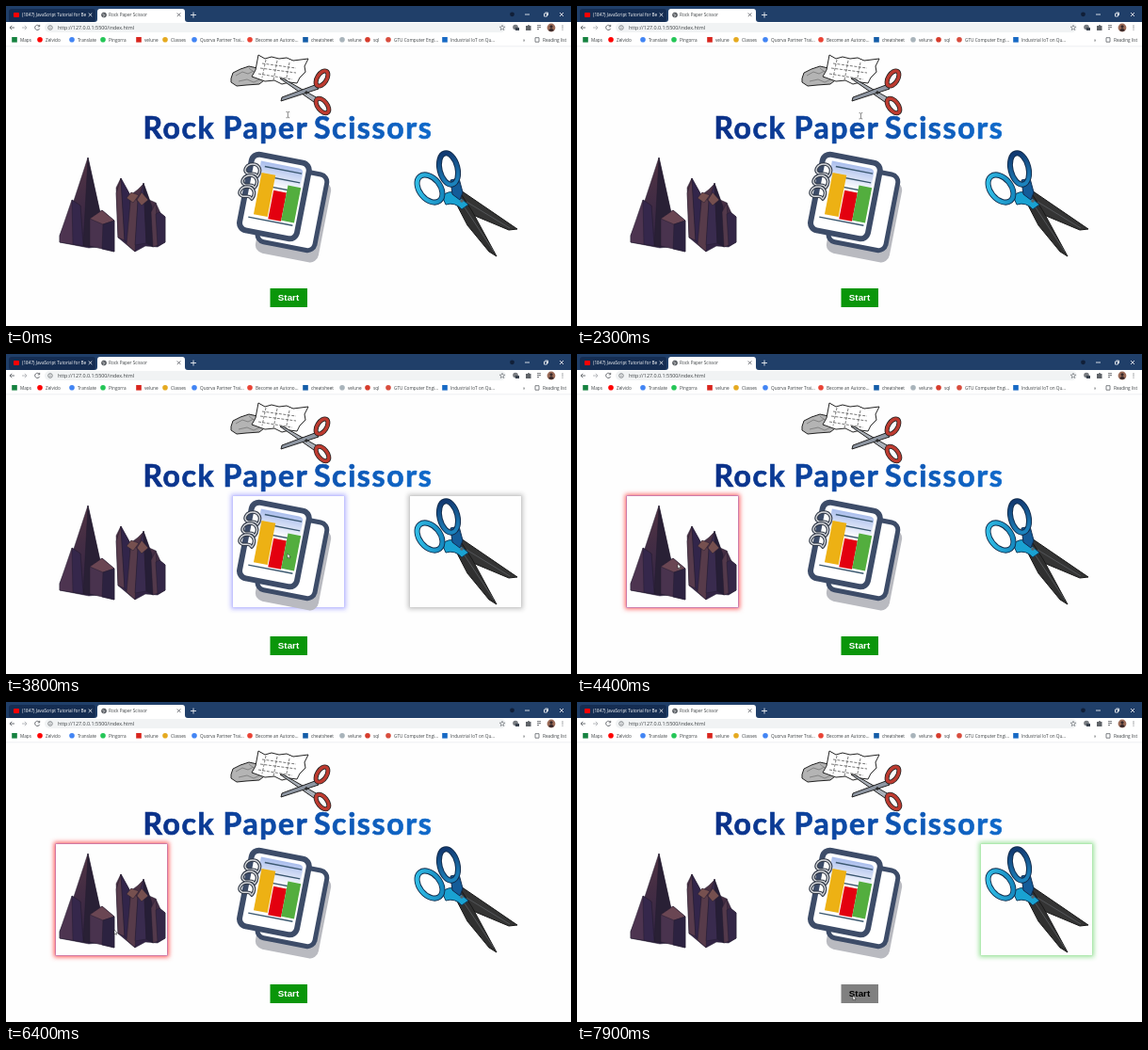
These frames come from a looping animation (600 px wide and 340 px high, 8000 ms). An HTML page:

```html
<!DOCTYPE html>
<html lang="en">
<head>
<meta charset="utf-8">
<title>Rock Paper Scissor</title>
<style>
html, body { margin: 0; width: 100%; height: 100%; overflow: hidden; background: #fefefe; }
svg { display: block; width: 600px; height: 340px; }
.ui { font-family: "Open Sans", "Noto Sans", sans-serif; font-size: 4.7px; fill: #3c4043; }
.title { font: 700 32px Lato, "Open Sans", sans-serif; letter-spacing: 1.6px; fill: url(#ink); stroke: url(#ink); stroke-width: .7; }
.icon { fill: none; stroke: #5f6368; stroke-width: .9; }
.window { fill: none; stroke: #fff; stroke-width: .8; }
.line { stroke: #222; stroke-width: 1; stroke-linejoin: round; }
</style>
</head>
<body>
<svg viewBox="0 0 600 340">
  <defs>
    <linearGradient id="ink" gradientUnits="userSpaceOnUse" x1="147" y1="0" x2="455" y2="0">
      <stop stop-color="#0a2f87"/><stop offset="1" stop-color="#0f6acb"/>
    </linearGradient>
    <linearGradient id="sky" x1="0" y1="0" x2="0" y2="1">
      <stop stop-color="#a9bdec"/><stop offset="1" stop-color="#fff"/>
    </linearGradient>
    <linearGradient id="cyan" x1="0" y1="0" x2="1" y2="1">
      <stop stop-color="#35c5ec"/><stop offset="1" stop-color="#1280b8"/>
    </linearGradient>
    <linearGradient id="navy" x1="0" y1="0" x2="0" y2="1">
      <stop stop-color="#123a72"/><stop offset="1" stop-color="#1c83bd"/>
    </linearGradient>
    <linearGradient id="dusk" x1="0" y1="0" x2="0" y2="1">
      <stop stop-color="#513443"/><stop offset="1" stop-color="#302345"/>
    </linearGradient>
    <filter id="soft" x="-20%" y="-20%" width="140%" height="140%"><feGaussianBlur stdDeviation="2.6"/></filter>
  </defs>

  <rect width="600" height="340" fill="#fefefe"/>

  <!-- Browser frame -->
  <rect width="600" height="17" fill="#203f69"/>
  <rect x="3" y="3" width="92" height="14" rx="3" fill="#152d52"/>
  <path d="M94 17q3 0 3-3V6q0-3 3-3h87q3 0 3 3v8q0 3 3 3z" fill="#fff"/>
  <rect y="17" width="600" height="26" fill="#fff"/>
  <rect x="41" y="18" width="490" height="10" rx="5" fill="#f1f3f4"/>
  <path d="M0 42.8H600" stroke="#e3e5e8" stroke-width=".6"/>
  <rect x="8" y="7" width="6" height="5" rx="1" fill="#f00"/>
  <g class="icon">
    <circle cx="104" cy="9.5" r="2.5" fill="#5f6368"/>
    <path d="M102.5 8.5l2 1-1 2" stroke="#fff" stroke-width=".6"/>
    <path d="M181.8 7.5l3.6 3.6m0-3.6l-3.6 3.6"/>
    <path d="M9 23H4m2.2-2.2L4 23l2.2 2.2"/>
    <path d="M17 23h5m-2.2-2.2L22 23l-2.2 2.2" stroke="#b0b3b7"/>
    <path d="M35.5 21.5a2.6 2.6 0 1 0 .2 2.4m0-4v2h-2"/>
    <circle cx="47" cy="23" r="2.3" stroke-width=".7"/><path d="M47 22.6v1.6m0-2.8v.5" stroke-width=".7"/>
    <path d="M527 20.3l.8 1.8 2 .1-1.6 1.3.5 2-1.7-1.1-1.7 1.1.5-2-1.6-1.3 2-.1z" stroke-width=".6"/>
    <path d="M564 20.7h4m-4 2h4m-4 2h2" />
    <path d="M562 33.7h4v4.5h-4z" stroke-width=".8"/>
  </g>
  <circle cx="541" cy="22.5" r="2.8" fill="#777b80"/><rect x="541" y="23" width="4" height="3" fill="#39424e"/>
  <path d="M552 21h2a1 1 0 0 1 2 0h1.5v5H552z" fill="#5f6368"/>
  <circle cx="579" cy="23" r="4.4" fill="#9b6b58"/>
  <circle cx="579" cy="21.8" r="1.6" fill="#392a2b"/><path d="M576 26q3-5 6 0-3 2-6 0" fill="#392a2b"/>
  <path d="M591 20.5v.9m0 1.2v.9m0 1.2v.9" stroke="#5f6368" stroke-width="1.1"/>
  <g class="window">
    <path d="M87.7 7.5l3.6 3.6m0-3.6l-3.6 3.6M196 9.5h6m-3-3v6M551 9h5M571.5 8h3v3h-3zm1-1h3v3M588 7l4 4m0-4l-4 4"/>
    <circle cx="537.5" cy="8.8" r="2.4" fill="#101f38" stroke="none"/>
  </g>
  <g class="ui">
    <text x="17" y="11.2" fill="#fff" style="fill:#fff">(1847) JavaScript Tutorial for Be</text>
    <text x="109" y="11.2">Rock Paper Scissor</text>
    <text x="55" y="25" font-size="5.5" style="font-size:5.4px">http://127.0.0.1:5500/index.html</text>
    <text x="549" y="38">»</text>
    <text x="570" y="37.7">Reading list</text>
    <g id="bookmarks"></g>
  </g>

  <!-- Small heading picture -->
  <g class="line">
    <path d="M239 77l2-6 8-4 9-3 9 2 5 6 2 7-5 4-14 1-10 1-6-4z" fill="#b4b4b4"/>
    <path d="M244 74l7-4 6 2 6-3M247 80l9-2 7 3 7-3M258 66l5 4 8 3" fill="none" stroke="#777" stroke-width=".8"/>
    <path d="M268 52l7 4 7-2 8 2 8-1 7 3 16-2-4 8 1 6-6 6-3 6-8-1-8 2-8-4-10 1-14-5 4-7z" fill="#fff"/>
    <path d="M272 61l36 5M270 66l38 5M268 72l36 6M276 57l-4 19M288 58l-4 21M301 60l-4 21" fill="none" stroke-width=".6" stroke-dasharray="3 1.5"/>
    <path d="M291 77l3 0 37 21-4 4z" fill="#aab0b8"/>
    <path d="M292 101l1-4 35-13 4 4z" fill="#8e96a2"/>
    <g fill="none">
      <ellipse cx="335.5" cy="77" rx="5" ry="9" transform="rotate(32 335.5 77)" stroke="#222" stroke-width="5"/>
      <ellipse cx="336" cy="106" rx="5" ry="9" transform="rotate(-38 336 106)" stroke="#222" stroke-width="5"/>
      <ellipse cx="335.5" cy="77" rx="5" ry="9" transform="rotate(32 335.5 77)" stroke="#bd3b30" stroke-width="3.4"/>
      <ellipse cx="336" cy="106" rx="5" ry="9" transform="rotate(-38 336 106)" stroke="#bd3b30" stroke-width="3.4"/>
    </g>
    <circle cx="319" cy="92" r="1.2" fill="#444"/>
  </g>
  <g class="title">
    <text x="145.5" y="141">Rock</text><text x="230.5" y="141">Paper</text><text x="327" y="141">Scissors</text>
  </g>

  <g id="glows"></g>

  <!-- Crystals -->
  <g stroke="#251c31" stroke-width=".5" stroke-linejoin="round">
    <path d="M87 161l-17 52-13 31v7l31 6 9-1 3-36z" fill="url(#dusk)"/>
    <path d="M87 161l-5 94 15 1 3-36z" fill="#292035"/>
    <path d="M70 206l-13 38v7l25 4-3-43z" fill="#4d3450"/>
    <path d="M70 206l9 6 3 43-11-2z" fill="#35274b"/>
    <path d="M89 226l13-9 13 11v33l-26-6z" fill="#49334e"/>
    <path d="M89 226l13-9 13 11-12 4z" fill="#6a4653"/>
    <path d="M103 232l12-4v33l-13-3z" fill="#2c2240"/>
    <path d="M122 183l10 18 8-6 6-6 6 17 7 3 5 11 5 4v27l-8 5-13-1-11 6-18-15-2-53z" fill="url(#dusk)"/>
    <path d="M122 183l-5 16 2 47 7 3z" fill="#573b4c"/>
    <path d="M122 183l10 18-2 52-4-4z" fill="#32254a"/>
    <path d="M133 198l7 10-3 53-9-8z" fill="#573b4a"/>
    <path d="M146 188l-6 20-3 46 12-2z" fill="#392b4e"/>
    <path d="M146 188l9 25 1 43-7-4z" fill="#261e36"/>
    <path d="M159 209l-5 10 2 37 6-2z" fill="#53394b"/>
    <path d="M159 221l4-2 6 5v27l-8 4z" fill="#342747"/>
    <path d="M128 204l5-6 8 3-6 8zm11 2l5-8 7 8-7 6z" fill="#76504f"/>
  </g>

  <!-- Notebook -->
  <g transform="translate(285 202) rotate(11)">
    <rect x="-9" y="-29" width="68" height="87" rx="9" fill="#b9bac0" transform="translate(-1 4)"/>
    <rect x="-10" y="-32" width="62" height="82" rx="8" fill="#fff" stroke="#3d4c68" stroke-width="5"/>
    <rect x="-31" y="-40.5" width="62" height="82" rx="8" fill="#fff" stroke="#3d4c68" stroke-width="6"/>
    <path d="M-21-34h41q5 0 5 5v20h-46z" fill="url(#sky)"/>
    <path d="M-16-29h40m-40 10h40m-40 10h40M-23 27h48" stroke="#3b5870" stroke-width="1.4"/>
    <path d="M-18-22h15v45h-15z" fill="#edb114"/>
    <path d="M-2-6h14v31H-2z" fill="#e3000f"/>
    <path d="M12-14h14v38H12z" fill="#53ae3e"/>
  </g>
  <g id="rings" fill="none" stroke-linecap="round"></g>

  <!-- Large scissors -->
  <g stroke-linejoin="round">
    <path d="M478 199l5-3 60 41-9 1-43-18z" fill="#343434" stroke="#181818"/>
    <path d="M474 202l8-4 13 20 26 48-8-5-23-28z" fill="#303030" stroke="#181818"/>
    <path d="M485 211l33 50M489 208l46 28" stroke="#606468" stroke-width=".7"/>
    <path d="M463 202q8-7 14-3l14 12-7 5q-7-8-17-5z" fill="#19a2d2" stroke="#103a5a"/>
    <path d="M472 185l9-2 4 15-3 8-8-6z" fill="#145c99" stroke="#102c50"/>
    <g fill="none">
      <ellipse cx="470" cy="173" rx="9.5" ry="17" transform="rotate(-14 470 173)" stroke="#102b4c" stroke-width="6"/>
      <ellipse cx="470" cy="173" rx="9.5" ry="17" transform="rotate(-14 470 173)" stroke="url(#navy)" stroke-width="4"/>
      <ellipse cx="450" cy="194" rx="11" ry="16.5" transform="rotate(-39 450 194)" stroke="#102b4c" stroke-width="6"/>
      <ellipse cx="450" cy="194" rx="11" ry="16.5" transform="rotate(-39 450 194)" stroke="url(#cyan)" stroke-width="4.2"/>
    </g>
    <circle cx="484" cy="207" r="1.8" fill="#59646b"/>
  </g>

  <rect id="button" x="280.5" y="300" width="39.5" height="20"/>
  <text id="label" x="300" y="313.2" text-anchor="middle" font-family="Liberation Sans, sans-serif" font-size="9.8" font-weight="700">Start</text>

  <path id="beam" d="M297.5 112.5h1.2l.6.6.6-.6h1.2m-1.8.6v5m-1.8.6h1.2l.6-.6.6.6h1.2" fill="none" stroke="#333" stroke-width=".6"/>
  <path id="arrow" d="M0 0v6l1.4-1.2 1 2 1-.5-.9-1.9H4.4z" fill="#fff" stroke="#222" stroke-width=".6"/>
</svg>
<script>
const LOOP = 8000;
const byId = id => document.getElementById(id);

function add(parent, tag, attrs, text = "") {
  const node = document.createElementNS("http://www.w3.org/2000/svg", tag);
  for (const key in attrs) node.setAttribute(key, attrs[key]);
  node.textContent = text;
  parent.append(node);
  return node;
}

const bookmarks = [
  [9, "Maps", "#15823f"], [36, "Zelvido", "#f00"], [70, "Translate", "#4285f4"],
  [103, "Pingorra", "#25c657"], [141, "velune", "#d9251d"], [169, "Classes", "#e5aa20"],
  [200, "Quorva Partner Trai...", "#4285f4"], [259, "Become an Autono...", "#ea4335"],
  [318, "cheatsheet", "#145da8"], [357, "velune", "#a9b4bb"], [384, "sql", "#d63c2c"],
  [406, "GTU Computer Engi...", "#d84d3e"], [466, "Industrial IoT on Qu...", "#1769c5"]
];
bookmarks.forEach(([x, name, fill], i) => {
  if (i % 4) add(byId("bookmarks"), "circle", { cx: x, cy: 35.8, r: 2.8, fill });
  else add(byId("bookmarks"), "rect", { x: x - 2.8, y: 33, width: 5.6, height: 5.6, fill });
  add(byId("bookmarks"), "text", { x: x + 6, y: 37.7 }, name);
});

for (let i = 0; i < 3; i++) {
  const d = `M${267 - i * 3} ${181 + i * 12}c5-6 2-13-5-13c-7 0-11 8-5 10c4 1 8-1 9 2`;
  add(byId("rings"), "path", { d, stroke: "#303846", "stroke-width": 3.6 });
  add(byId("rings"), "path", { d, stroke: "#d6d8dc", "stroke-width": 1.4 });
}

// Card x, outer colour, inner colour, hover start and end
const hovers = [
  [429, "#222", "#222", 2700, 3580],
  [241, "#2929ff", "#2929ff", 3740, 3920],
  [53, "#ff6464", "#4545f0", 4000, 4680],
  [241, "#2929ff", "#2929ff", 4840, 5600],
  [53, "#ff5555", "#5555ee", 5780, 6600],
  [241, "#2929ff", "#2929ff", 6700, 6840],
  [429, "#2fc52f", "#2fc52f", 6950, 7740]
].map(([x, outer, inner, start, end]) => {
  const group = add(byId("glows"), "g", {});
  const box = (grow, attrs) => add(group, "rect", {
    x: x - grow, y: 151 - grow, width: 118 + 2 * grow, height: 118 + 2 * grow, ...attrs
  });
  box(2, { fill: outer, filter: "url(#soft)" });
  box(0.5, { fill: inner, opacity: .55 });
  box(0, { fill: "#fefefe" });
  return { group, start, end };
});

const path = [
  [0, 299, 115], [2250, 299, 115], [3000, 457, 203], [3450, 457, 203],
  [4200, 107, 223], [4560, 107, 223], [5150, 313, 223], [5450, 313, 223],
  [6150, 115, 242], [6450, 115, 242], [7150, 480, 225], [7400, 480, 225],
  [7820, 293, 312], [LOOP, 293, 312]
];

const clamp = v => Math.max(0, Math.min(1, v));
const ease = v => v * v * (3 - 2 * v);

function pointer(t) {
  const i = path.findIndex(p => p[0] > t);
  const [t0, x0, y0] = path[i - 1], [t1, x1, y1] = path[i];
  const k = ease((t - t0) / (t1 - t0));
  return [x0 + (x1 - x0) * k, y0 + (y1 - y0) * k];
}

function draw(t) {
  for (const { group, start, end } of hovers) {
    group.setAttribute("opacity", clamp((t - start) / 180) * (1 - clamp((t - end) / 300)));
  }
  const [x, y] = pointer(t);
  const onTitle = x < 455 && y < 146 && t < 3000;
  const onButton = x > 280 && x < 320 && y > 300;
  byId("beam").setAttribute("transform", `translate(${x - 299} ${y - 115})`);
  byId("beam").setAttribute("visibility", onTitle ? "visible" : "hidden");
  byId("arrow").setAttribute("transform", `translate(${x} ${y}) scale(.8)`);
  byId("arrow").setAttribute("visibility", onTitle ? "hidden" : "visible");
  byId("button").setAttribute("fill", onButton ? "#808080" : "#0a960a");
  byId("label").setAttribute("fill", onButton ? "#000" : "#fff");
}

function tick() {
  draw(performance.now() % LOOP);
  requestAnimationFrame(tick);
}
tick();
</script>
</body>
</html>
```
